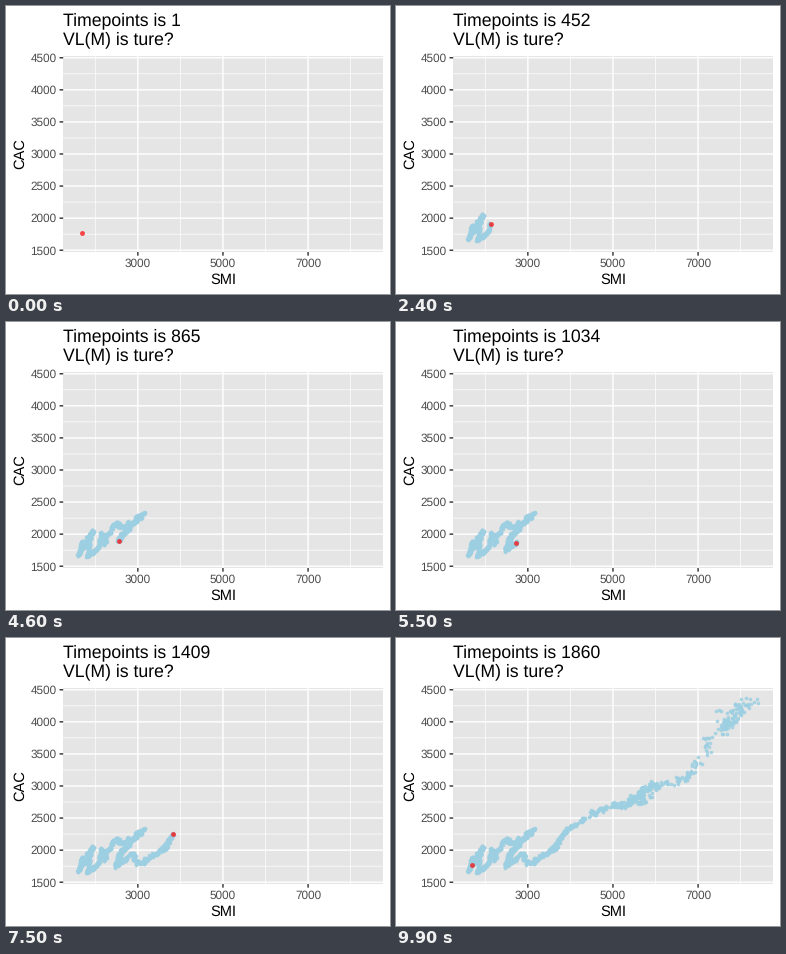
A matplotlib script that plays this animation: 384x288 px, repeating every 10 s.

```python
import numpy as np
import matplotlib.pyplot as plt
from matplotlib.animation import FuncAnimation
from matplotlib.lines import Line2D

W, H, DPI = 384, 288, 96
PX = 72 / DPI
FRAMES, DAYS = 100, 1860
LEFT, RIGHT, TOP, BOTTOM = 57.2, 376.7, 50, 246
XLIM, YLIM = (1246.2, 8753.2), (1472.1, 4527.4)

plt.rcParams["font.family"] = "Liberation Sans"
plt.rcParams["text.hinting"] = "none"

# Turning points of the walk: day, SMI, CAC
TURNS = [
    (1, 1678, 1772), (60, 1700, 1880), (125, 1600, 1660), (235, 1930, 2050),
    (320, 1800, 1650), (417, 2070, 1790), (469, 2150, 2020), (495, 2200, 1860),
    (573, 2440, 2160), (620, 2670, 2110), (660, 3130, 2320), (781, 2600, 1980),
    (963, 2490, 1760), (1065, 2860, 1950), (1119, 3030, 1775),
    (1240, 3655, 2050), (1330, 3580, 2010), (1431, 3900, 2310),
    (1505, 4700, 2640), (1560, 5555, 2760), (1590, 5930, 3050),
    (1658, 5250, 2700), (1735, 6900, 3230), (1770, 7450, 3850),
    (1845, 8300, 4320), (1860, 7680, 4000),
]


def walk():
    """Straight runs between the turns, with smoothed market noise."""
    rng = np.random.default_rng(4)
    day = np.arange(1, DAYS + 1)
    turn, smi, cac = np.transpose(TURNS)
    spread = np.interp(day, [1, 20, 1450, DAYS], [0, 0.009, 0.009, 0.018])
    shared, a, b = (np.convolve(rng.normal(size=DAYS), np.ones(4) / 2, "same")
                    for _ in range(3))
    return np.column_stack([
        np.interp(day, turn, smi) * (1 + spread * (0.5 * shared + 0.9 * a)),
        np.interp(day, turn, cac) * (1 + spread * (0.8 * shared + 0.7 * b)),
    ])


points = walk()

fig = plt.figure(figsize=(W / DPI, H / DPI), dpi=DPI, facecolor="white")
ax = fig.add_axes([LEFT / W, 1 - BOTTOM / H,
                   (RIGHT - LEFT) / W, (BOTTOM - TOP) / H])
ax.set(xlim=XLIM, ylim=YLIM, xticks=[], yticks=[], facecolor="#E5E5E5")
ax.spines[:].set_visible(False)


def label(x, y, text, size, **kw):
    return fig.text(x / W, 1 - y / H, text, fontsize=size * PX,
                    va="baseline", **kw)


def tick(xs, ys):
    fig.add_artist(Line2D([x / W for x in xs], [1 - y / H for y in ys],
                          color="#333333", lw=1.07, snap=False,
                          solid_capstyle="butt"))


def to_px(v, lim, start, end):
    return start + (v - lim[0]) / (lim[1] - lim[0]) * (end - start)


for v in range(2000, 8001, 1000):
    major = v % 2000 == 1000
    ax.axvline(v, color="white", lw=1.07 if major else 0.53,
               snap=False, zorder=0)
    if major:
        x = to_px(v, XLIM, LEFT, RIGHT)
        tick([x, x], [BOTTOM, BOTTOM + 3.67])
        label(x, 261, str(v), 11.73, ha="center", color="#4D4D4D")

for v in range(1500, 4501, 250):
    major = v % 500 == 0
    ax.axhline(v, color="white", lw=1.07 if major else 0.53,
               snap=False, zorder=0)
    if major:
        y = to_px(v, YLIM, BOTTOM, TOP)
        tick([LEFT - 3.67, LEFT], [y, y])
        label(50.5, y + 4.2, str(v), 11.73, ha="right", color="#4D4D4D")

label(217, 278, "SMI", 14.67, ha="center")
label(18, 148, "CAC", 14.67, ha="center", rotation=90, rotation_mode="anchor")
title = label(57, 19.3, "", 17.6)
label(57, 38.3, "VL(M) is ture?", 17.6)

trail = ax.scatter([], [], s=(3.6 * PX) ** 2, c="#9BCFE1", alpha=0.85, lw=0,
                   zorder=2)
dot = ax.scatter([], [], s=(4.9 * PX) ** 2, c="red", alpha=0.7, lw=0, zorder=3)


def draw(i):
    day = round(0.9 + 18.78 * i)
    title.set_text(f"Timepoints is {day}")
    trail.set_offsets(points[:day - 1])
    # The marker wraps to the start on the last day
    dot.set_offsets(points[[(day - 1) % (DAYS - 1)]])
    return title, trail, dot


anim = FuncAnimation(fig, draw, frames=FRAMES, interval=100,
                     repeat=True, repeat_delay=0)
plt.show()
```
